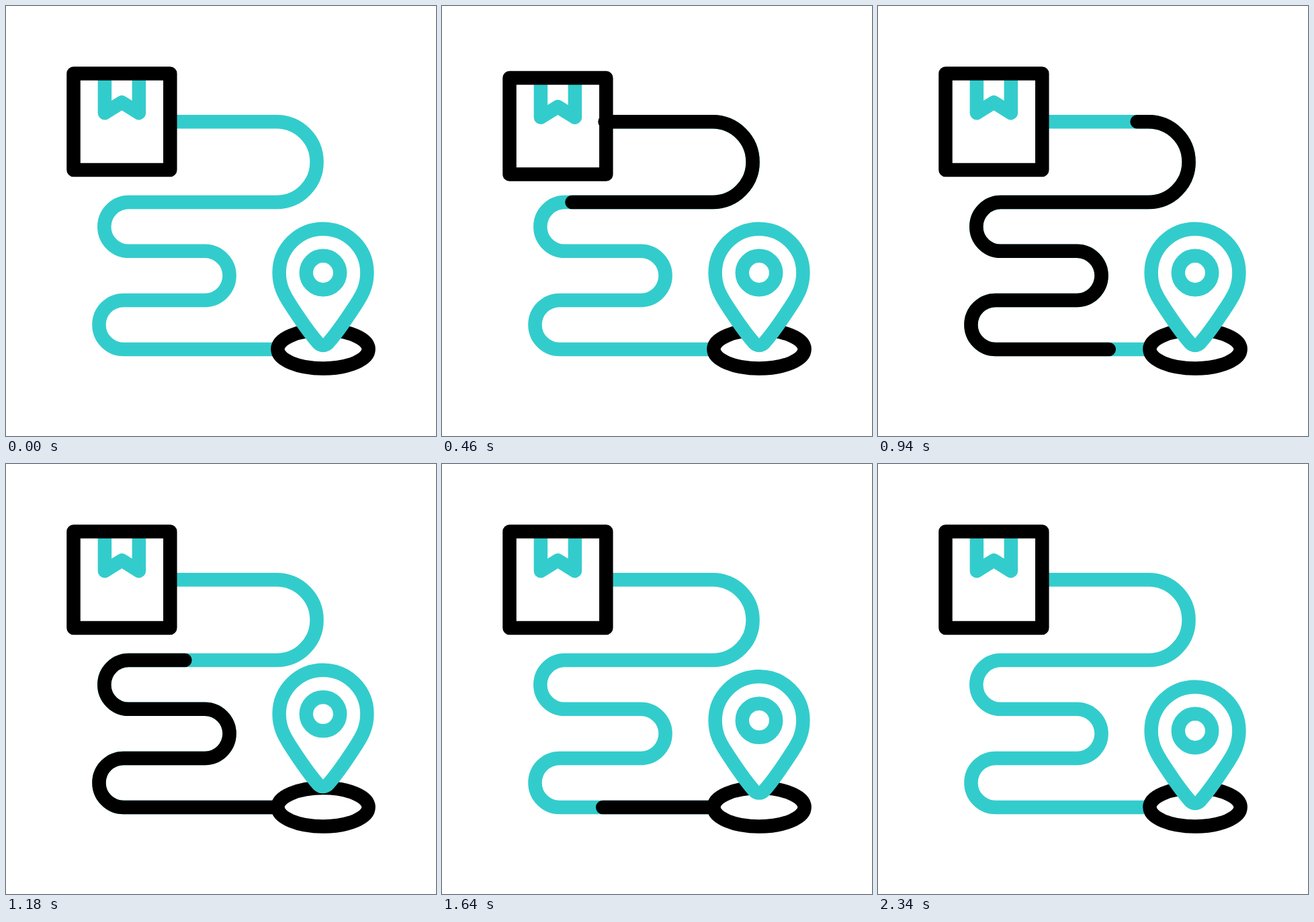
An HTML page for the animation above (2400 ms loop, 640 by 640 pixels).

```html
<!DOCTYPE html>
<html lang="en">
<head>
<meta charset="utf-8">
<title>Parcel route</title>
<style>
  html, body { margin: 0; width: 100%; height: 100%; overflow: hidden; background: #fff; }
  svg { display: block; width: 100vw; height: 100vh; }
  .line { fill: none; stroke-width: 20.5; stroke-linejoin: round; }
  .teal { stroke: #33cccc; }
  .black { stroke: #000; }
  .solid { fill: #fff; }
</style>
</head>
<body>
<svg viewBox="0 0 640 640">
  <defs>
    <path id="route" d="M242.5 172.3H402.7A59.85 59.85 0 0 1 402.7 292H182.7A36.4 36.4 0 0 0 182.7 364.8H296A36.55 36.55 0 0 1 296 437.9H175A36.55 36.55 0 0 0 175 511H404"/>
  </defs>
  <use href="#route" class="line teal"/>
  <use href="#route" class="line black" id="trail" stroke-linecap="round"/>
  <g id="box">
    <path class="line teal" d="M146.9 100.5V159.2L172.4 143.4L197.9 159.2V100.5"/>
    <rect class="line black" x="100.5" y="100.5" width="143.8" height="143.6"/>
  </g>
  <ellipse class="line black" cx="472" cy="510.8" rx="67.6" ry="28.7"/>
  <g id="pin">
    <path class="line teal solid" d="M406.6 397A65.4 65.4 0 0 1 537.4 397C537.4 417 530 430 521 444C510 461 495 484 479.5 501.5C475.5 506 468.5 506 464.5 501.5C449 484 434 461 423 444C414 430 406.6 417 406.6 397Z"/>
    <circle class="line teal" cx="472" cy="397" r="25.2"/>
  </g>
</svg>
<script>
  const LOOP = 2400, STEP = 20, LAST = 2340;
  const el = id => document.getElementById(id);
  const trail = el('trail'), box = el('box'), pin = el('pin');
  const total = el('route').getTotalLength();

  // [time, vertical offset]
  const boxKeys = [[0, 0], [233, -24.2], [467, 6.6], [700, -14.2], [933, 0]];
  const pinKeys = [[1060, 0], [1294, -48], [1526, 0], [1757, -31.3], [1988, 0], [2165, -16], [2340, 0]];

  const ease = (t, from, to) => {
    const p = Math.min(1, Math.max(0, (t - from) / (to - from)));
    return p * p * (3 - 2 * p);
  };

  const track = (keys, t) => {
    let y = keys[0][1];
    for (let i = 1; i < keys.length; i++) {
      const [t0, y0] = keys[i - 1], [t1, y1] = keys[i];
      y += (y1 - y0) * ease(t, t0, t1);
    }
    return y;
  };

  function draw(t) {
    const head = total * ease(t, -20, 1080);
    const tail = total * ease(t, 700, 1900);
    const shown = t > 0 && head - tail > 0.5;
    trail.style.display = shown ? '' : 'none';
    trail.style.strokeDasharray = `${Math.max(0, head - tail)} ${total * 2}`;
    trail.style.strokeDashoffset = -tail;
    box.setAttribute('transform', `translate(0 ${track(boxKeys, t)})`);
    pin.setAttribute('transform', `translate(0 ${track(pinKeys, t)})`);
  }

  const start = performance.now();
  function tick() {
    const t = (performance.now() - start) % LOOP;
    draw(Math.min(LAST, Math.floor(t / STEP) * STEP));
    requestAnimationFrame(tick);
  }
  tick();
</script>
</body>
</html>
```
